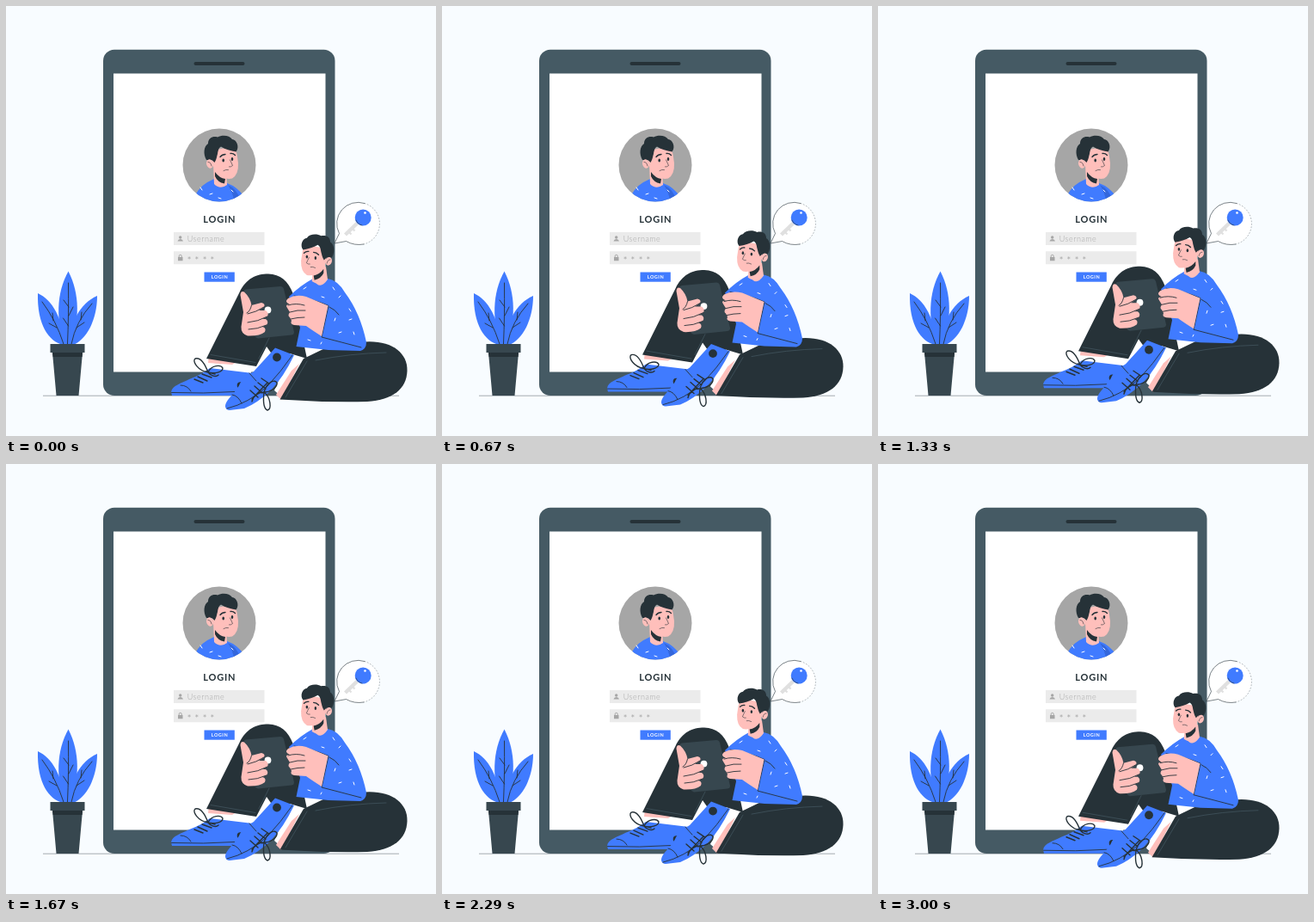
Recreate the animation shown at these times as an HTML page. Size 500 px wide and 500 px high, loop 3.04 s.

```html
<!DOCTYPE html>
<html lang="en">
<head>
<meta charset="utf-8">
<title>Login</title>
<style>
html, body { margin: 0; height: 100%; overflow: hidden; background: #f8fcff; }
svg { display: block; width: 100%; height: 100%; }
text { font-family: Lato, Inter, sans-serif; }
.blue { fill: #407bff; }
.dark { fill: #263238; }
.slate { fill: #37474f; }
.steel { fill: #455a64; }
.skin { fill: #ffbfbb; }
.white { fill: #fff; }
.line { fill: none; stroke: #263238; stroke-width: .9; stroke-linecap: round; stroke-linejoin: round; }
.bold { stroke-width: 1.4; }
.thin { stroke-width: .6; }
.soft { fill: none; stroke: #455a64; stroke-width: .7; stroke-linecap: round; }
.fleck { fill: none; stroke: #fff; stroke-width: 1; stroke-linecap: round; }
</style>
</head>
<body>
<svg viewBox="0 0 500 500">
<defs>
  <clipPath id="disc"><circle cx="248" cy="185" r="42.5"/></clipPath>
  <!-- head, looking right -->
  <g id="head">
    <path class="skin" d="M241 182L242 207Q249 214 257 208L256 194Z"/>
    <path class="dark" d="M243 193Q248 200 255 201L254 206.500Q246 205 243 198Z"/>
    <path class="skin" d="M240 168L266 163Q269 172 270 183Q270.500 196 263 200.500Q254 202.500 246 195Q241 190 240 180Z"/>
    <path class="dark" d="M233 179C229 172 230 163 235 160C235 153 241 151 246 152.500C251 149.500 260 150 263 155C268 155 272 164 267.500 169.500C261 168 255 167 250 163.500C247 165 246.500 169 246 172C245 175 245 178 242.500 182L239.500 179Z"/>
    <ellipse class="skin" cx="237" cy="183.500" rx="3.900" ry="5.200" transform="rotate(-15 237 183.500)"/>
    <path class="line thin" d="M235 181.500Q238 181 239 186M260.500 179Q262 182 263.500 185.500Q261.500 187.500 259.500 187M253 191.500Q256 189.800 258.500 190.500"/>
    <path class="line bold" d="M249 175.500Q251.500 172.500 255 172.500M261 171.500Q264 171 266.500 173.500"/>
    <ellipse class="dark" cx="252.700" cy="179.500" rx="1.300" ry="2"/>
    <ellipse class="dark" cx="263" cy="178" rx="1.300" ry="2"/>
  </g>
</defs>

<rect width="500" height="500" fill="#f8fcff"/>
<path d="M43 453.200H457" stroke="#263238" stroke-width=".4"/>

<!-- big tablet -->
<rect class="steel" x="113" y="50.700" width="269.500" height="402.300" rx="13"/>
<path d="M220.500 67H275.500" stroke="#263238" stroke-width="4" stroke-linecap="round"/>
<rect class="white" x="125" y="78.500" width="246.500" height="347"/>

<!-- profile picture -->
<circle cx="248" cy="185" r="42.500" fill="#a6a6a6"/>
<g clip-path="url(#disc)">
  <path class="blue" d="M215 230Q222 212 234 205L242 201Q249 211 257 206Q269 210 277 222L280 230Z"/>
  <path d="M258 208Q270 213 274 230H266Q264 217 258 208Z" fill="#3467dc"/>
  <use href="#head"/>
  <path class="fleck" d="M226 211l2 3M237 219l3-1M247 223l3 1M262 214l2 2"/>
</g>

<!-- form -->
<text x="229.300" y="251.600" font-size="11" font-weight="700" letter-spacing=".8" fill="#263238">LOGIN</text>
<path d="M195 263H300.500V278H195ZM195 285.300H300.500V300.300H195Z" fill="#ebebeb"/>
<g fill="#a6a6a6">
  <circle cx="202.700" cy="269" r="1.700"/>
  <path d="M199.500 273.500Q200 271 202.700 271Q205.500 271 206 273.500ZM200 292H205.500V296.300H200Z"/>
  <path d="M201.200 292V290.800a1.500 1.500 0 0 1 3 0V292" fill="none" stroke="#a6a6a6"/>
  <text x="210.700" y="273.600" font-size="9" font-weight="300" letter-spacing=".55">Username</text>
  <text x="210.700 219.500 228.700 237.500" y="300" font-size="11">****</text>
</g>
<rect class="blue" x="230.500" y="309.500" width="35.300" height="11.200"/>
<text x="238.700" y="317" font-size="5.500" font-weight="700" letter-spacing=".5" fill="#fff">LOGIN</text>

<!-- plant -->
<path class="blue" d="M66 394C50 390 36 371 37 334C54 342 65 362 69 394Z"/>
<path class="blue" d="M74 394C74 368 86 346 106 337C106 364 94 388 78 394Z"/>
<path class="blue" d="M69 394C58 368 58 334 72.500 308.500C86 334 86 368 74 394Z"/>
<path class="line" d="M42 344Q58 365 67 393M100 346Q81 367 76 393M72.500 322Q73 360 71.500 393M73 350l-6-8M73 360l5-10M72.500 372l-6-9M55 366l-1-9M59 374l-9-5M87 365l1-9M82 374l9-6"/>
<path class="slate" d="M51.500 393H91.500V403H51.500ZM54 403H89L84.500 453H58.500Z"/>
<path class="dark" d="M54 403H89L88.500 408H54.700Z"/>

<!-- speech bubble with key -->
<path class="white" d="M387.500 264.500A24.700 24.700 0 1 1 395.500 273.500L382 276Z"/>
<path class="line" stroke-dasharray="1 2.500" style="stroke-width:.35" d="M417 229.500A24.700 24.700 0 0 1 416 277"/>
<path class="line thin" d="M417 229.500A24.700 24.700 0 0 0 387.500 264.500L382 276L395.500 273.500Q405 279 416 277"/>
<path d="M410 251L394.500 266" fill="none" stroke="#e0e0e0" stroke-width="4.400"/>
<path d="M399 263l2.500 2.500M403 259l2.500 2.500" stroke="#e0e0e0" stroke-width="2.400"/>
<circle class="blue" cx="415.200" cy="246" r="9.500"/>
<circle class="white" cx="417.500" cy="240.500" r="1.300"/>
<path class="line thin" d="M407 249Q409 254 414 255"/>

<g id="person">
  <!-- raised leg -->
  <path class="white" d="M237 408L287 417L284 430L238 422Z"/>
  <path class="skin" d="M236 406L268 414L263 417L235 415Z"/>
  <path class="dark" d="M233 410L271.500 333C279 317 291 311.500 305 311.500C319 312 328 319 334 335L350 410L315 413L303 396L291 419Z"/>
  <path class="soft" d="M238 405.500L290 414.500M306 386L294 410"/>
  <!-- far shoe -->
  <path class="blue" d="M192 449C193 441 204 439 213 434Q227 429 237 421L287 427L280 446L264 453H193Z"/>
  <path class="line" d="M192.500 449.500Q230 451 266 448.500M203 441Q211 441 215 448"/>
  <circle class="dark" cx="272.500" cy="441" r="3.800"/>
  <path class="line bold" d="M219 434l10 4M223 431l11 5M228 428l11 4M232 425l11 3M235 426C223 424 216 413 220 410C227 408 232 418 235 426C239 417 250 417 252 421C252 426 242 428 235 426C238 430 244 432 247 429"/>

  <!-- folded leg -->
  <path class="white" d="M330 404L350 410L322 456L312 447Z"/>
  <path class="skin" d="M341 416L320 458L314 452L332 424Z"/>
  <path class="dark" d="M318.500 457.500L346 410L375 396L412 391C446 387 467 402 466.500 424C466 445 450 458 420 460Q370 461 318.500 457.500Z"/>
  <path class="soft" d="M325 455L350 413M360 412Q400 404 442 403"/>

  <!-- torso and sleeves -->
  <path class="blue" d="M357 317Q342 325 329 338L335 350L342 374L337.500 396L375 400L412 401Q419 399 419 391Q412 357 394 333Q386 319 374 317Z"/>
  <path class="line" d="M335 337Q358 341 375 348.500L367 385Q390 391 413 397M376 350Q383 353 387 359"/>
  <path class="fleck" d="M349 327l-3 2M380 327l2 3M367 338l3 1M389 337l-2 2M399 352l2 3M383 363l-1 3M404 379l1 3M390 379l-3 1M351 388l3 1M366 393l1-2M399 365l3-1"/>
  <path class="skin" d="M358 312L358 319Q365 331 374 318L372 303Z"/>
  <use href="#head" transform="translate(605 122.500) scale(-.97 .95)"/>

  <!-- near shoe -->
  <path class="blue" d="M255 466C255 457 267 451 272 439Q276 432 288 425L313 397.500L335 406Q323 431 308 447Q292 462 277 468L260 470Q256 470 255 466Z"/>
  <path class="line" d="M257 468Q282 462 304 442Q320 425 333 406M263 452Q270 453 274 462M283 427l8 9"/>
  <circle class="dark" cx="315" cy="408.500" r="4.900"/>
  <path class="line bold" d="M284 447l9 8M289 442l9 8M293 438l9 7M297 433l9 6M286 457L304 438M300 449C304 436 313 434 315 438C316 444 307 449 300 449C308 455 309 469 304 470C299 468 299 458 300 449C293 449 287 454 286 460"/>

  <!-- small tablet -->
  <path class="slate" d="M279 329.500L319 326Q322 326 323 329L335 379Q335 382 332 382.500L293 386.500Q290 386 289 383L276 334Q276 330 279 329.500Z"/>
  <circle class="white" cx="304.500" cy="353.500" r="3.900"/>

  <!-- left hand -->
  <path class="skin" d="M272.500 336Q273 330.500 277 332.500Q284 339 285.500 348L297 345Q302 346 300 350L294 354L302 354Q306 357 304 361L298 364L302 364Q306 367 303 371L298 373Q303 374 301 379Q295 384 281 383.500Q273 381 273.500 373L276 356Z"/>
  <path class="line" d="M285.500 348Q284 355 280 357M300 350Q291 356 281 358M304 361Q293 367 281 368M303 371Q292 376 282 376"/>

  <!-- right hand -->
  <path class="skin" d="M328 340Q337 335 349 338L374.500 348.500L367 384Q356 377 349 372L335 371Q330 370 332 366L330 362Q327 360 330 356L327 351Q324 347 330 347Q323 344 328 340Z"/>
  <path class="line" d="M328 348Q337 345 347 348M330 356Q339 353 348 354M331 364Q339 362 347 362"/>
</g>
</svg>
<script>
const person = document.getElementById("person");
const LOOP = 3040, LIFT = 10;
const start = performance.now();

function draw() {
  const p = (performance.now() - start) % LOOP / LOOP;
  const lift = LIFT * (1 - Math.abs(1 - 2 * p));
  person.setAttribute("transform", `translate(0 ${-lift.toFixed(2)})`);
  requestAnimationFrame(draw);
}
draw();
</script>
</body>
</html>
```
